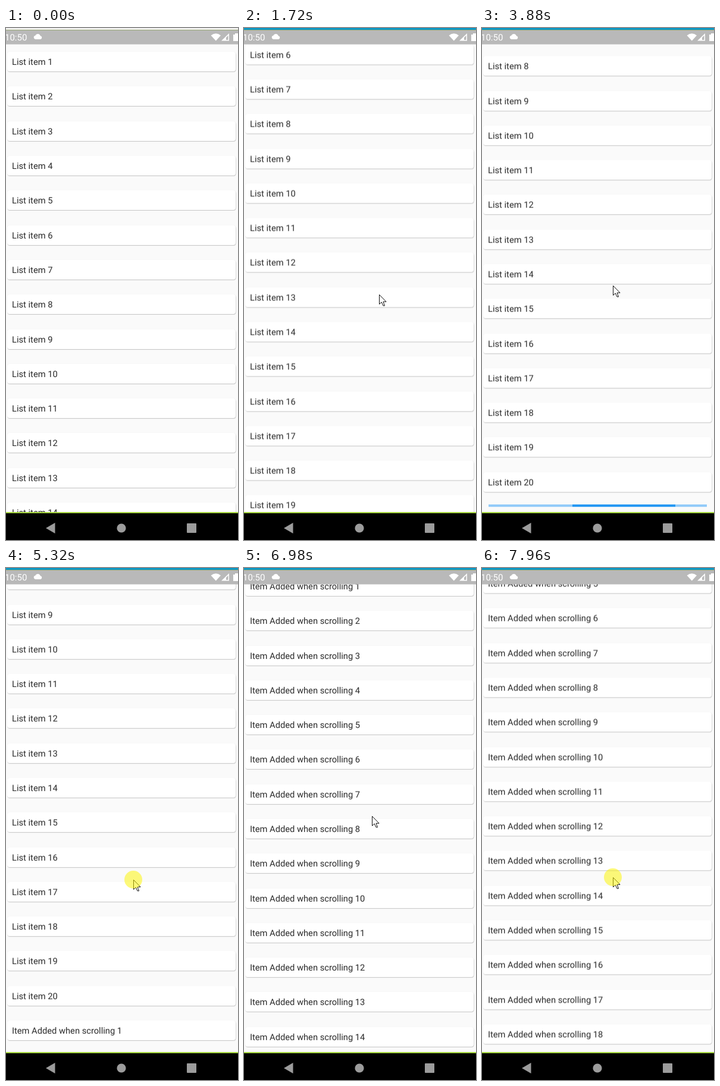
Animation, 390 px wide and 861 px high, one loop 8000 ms. Source, as an HTML page:

```html
<!DOCTYPE html>
<html lang="en">
<head>
<meta charset="utf-8">
<title>Endless list</title>
<style>
  html, body { margin: 0; width: 100%; height: 100%; overflow: hidden; background: #fafafa; }
  #stage { position: relative; width: 390px; height: 861px; overflow: hidden; background: #fafafa; font-family: Roboto, sans-serif; text-rendering: geometricPrecision; }
  #stage svg { position: absolute; left: 0; top: 0; }
  #view { position: absolute; left: 0; top: 27px; width: 390px; height: 787px; overflow: hidden; }
  #list { position: absolute; left: 0; top: -27px; width: 390px; will-change: transform; }
  .card {
    position: absolute; left: 2px; width: 384px; height: 33px; box-sizing: border-box;
    padding-left: 8px; border-radius: 4px; background: #fff; color: #2a2a2a;
    font-size: 14.7px; line-height: 34px; white-space: pre;
    box-shadow: .5px 1px 1px rgba(0,0,0,.22), 0 0 1px rgba(0,0,0,.08);
  }
  #loader { position: absolute; left: 10.5px; top: 1202px; width: 367.5px; height: 4px; background: #90caf9; overflow: hidden; }
  #loader i { position: absolute; top: 0; height: 4px; background: #2196f3; }
  #clock { position: absolute; left: -2px; top: 6px; font-size: 15px; line-height: 20px; color: #fff; }
</style>
</head>
<body>
<div id="stage">
  <div id="view"><div id="list"><div id="loader"><i></i><i></i></div></div></div>
  <svg width="390" height="861">
    <rect width="390" height="27.5" fill="#b9b9b9"/>
    <rect id="edge" width="390" height="3"/>
    <rect y="3" width="390" height="1" fill="#98a878"/>
    <g fill="#fff">
      <path d="M49.500 19a3.200 3.200 0 0 1-.3-6.300a4.600 4.600 0 0 1 8.600 .6a2.900 2.900 0 0 1 .2 5.700z"/>
      <path d="M344.500 12.500Q353 6 361 12.500L352.800 21.500z"/>
      <path fill-rule="evenodd" d="M362 21.500L375 9v12.500zM370 20h3.500v-7.500L370 16z"/>
      <path d="M382 11h3V9h5v13h-8z"/>
    </g>
    <rect y="814" width="390" height="2" fill="#a4d63c"/>
    <rect y="816" width="390" height="45" fill="#000"/>
    <g fill="#9c9c9c">
      <path d="M67 841L82.500 832v18z"/>
      <circle cx="194" cy="841" r="7.600"/>
      <rect x="304" y="833" width="16" height="16" rx="1"/>
    </g>
    <g id="pointer">
      <path d="M.5 .5V16.500L4.200 13L7 19H9.500L7 12.300H12z" fill="#fff" stroke="#111"/>
      <circle id="press" r="15" fill="#fbf300" fill-opacity=".52"/>
    </g>
  </svg>
  <div id="clock">10:50</div>
</div>
<script>
const LOOP = 8000, TICK = 69.25, PITCH = 58.29, FIRST = 20, ADDED = 22, LOADED = 67;
const GLIDE_TICKS = 4, LEAN = .055;
const $ = id => document.getElementById(id);

// Drags of the pointer in ticks; glide is the scroll that follows the release
const gestures = [
  { from: 3, to: 8, x: 235, y: 598, end: 448, glide: 157.3 },
  { from: 31, to: 38, x: 232, y: 560, end: 372, glide: -96.3 },
  { from: 46, to: 64, x: 220, y: 433, end: 433, glide: 0 },
  { from: 72, to: 79, x: 216.5, y: 570, end: 320, glide: 285.7 },
  { from: 90, to: 97.5, x: 226, y: 614, end: 417, glide: 199.2 },
  { from: 107, to: 115, x: 226, y: 623, end: 440, glide: 0 }
];

const clamp = u => Math.min(1, Math.max(0, u));
const smooth = u => u * u * (3 - 2 * u);
const mix = (a, b, u) => a + (b - a) * u;
const pulled = (g, n) => (g.y - g.end) * clamp((n - g.from) / (g.to - g.from)) ** 2;
const glided = (g, n) => g.glide * (1 - Math.exp(-Math.max(0, n - g.to) / GLIDE_TICKS));
const scrollAt = n => gestures.reduce((sum, g) => sum + pulled(g, n) + glided(g, n), 0);

function pointerAt(n) {
  const i = Math.max(0, gestures.findLastIndex(g => n >= g.from));
  const g = gestures[i], next = gestures[i + 1] || g;
  const d = pulled(g, n), u = smooth(clamp((n - next.from + 8) / 6));
  const back = next === g ? 0 : u;
  return {
    x: mix(g.x - d * LEAN, next.x, back),
    y: mix(g.y - d, next.y, back),
    down: n >= g.from && n < g.to && g.y !== g.end
  };
}

// Cubic bezier easing with y handles 0 and 1
function ease(x1, x2, x) {
  if (x <= 0) return 0;
  if (x >= 1) return 1;
  let lo = 0, hi = 1;
  for (let i = 0; i < 20; i++) {
    const p = (lo + hi) / 2, q = 1 - p;
    if (3 * q * q * p * x1 + 3 * q * p * p * x2 + p * p * p < x) lo = p; else hi = p;
  }
  return smooth(lo);
}

const list = $("list"), loader = $("loader"), bars = loader.children, extra = [];
for (let i = 0; i < FIRST + ADDED; i++) {
  const card = document.createElement("div");
  card.className = "card";
  card.style.top = 40.2 + i * PITCH + "px";
  card.textContent = i < FIRST ? "List item " + (i + 1) : "Item Added when scrolling " + (i - FIRST + 1);
  list.append(card);
  if (i >= FIRST) extra.push(card);
}

function setBar(bar, tail, head) {
  bar.style.left = tail * 100 + "%";
  bar.style.width = Math.max(0, head - tail) * 100 + "%";
}

const show = (el, on) => { el.style.display = on ? "" : "none"; };

function draw(n) {
  list.style.transform = `translateY(${-scrollAt(n)}px)`;
  extra.forEach(card => show(card, n >= LOADED));
  show(loader, n < LOADED);
  const p = ((n - 39) * TICK + 365 + 3600) % 1800;
  setBar(bars[0], ease(.4, 1, (p - 333) / 750), ease(.2, .8, p / 750));
  setBar(bars[1], ease(.1, .45, (p - 1267) / 533), ease(0, .65, (p - 1000) / 567));
  $("edge").setAttribute("fill", n < 1 ? "#f1f1ee" : "#0b98c5");
  const { x, y, down } = pointerAt(n);
  show($("pointer"), n >= 1);
  show($("press"), down);
  $("pointer").setAttribute("transform", `translate(${Math.round(x)} ${Math.round(y)})`);
}

const start = performance.now();
let shown = -1;
function frame() {
  const t = (performance.now() - start) % LOOP;
  const n = t < 190 ? 0 : Math.floor((t - 180) / TICK) + 1;
  if (n !== shown) draw(shown = n);
  requestAnimationFrame(frame);
}
frame();
</script>
</body>
</html>
```
